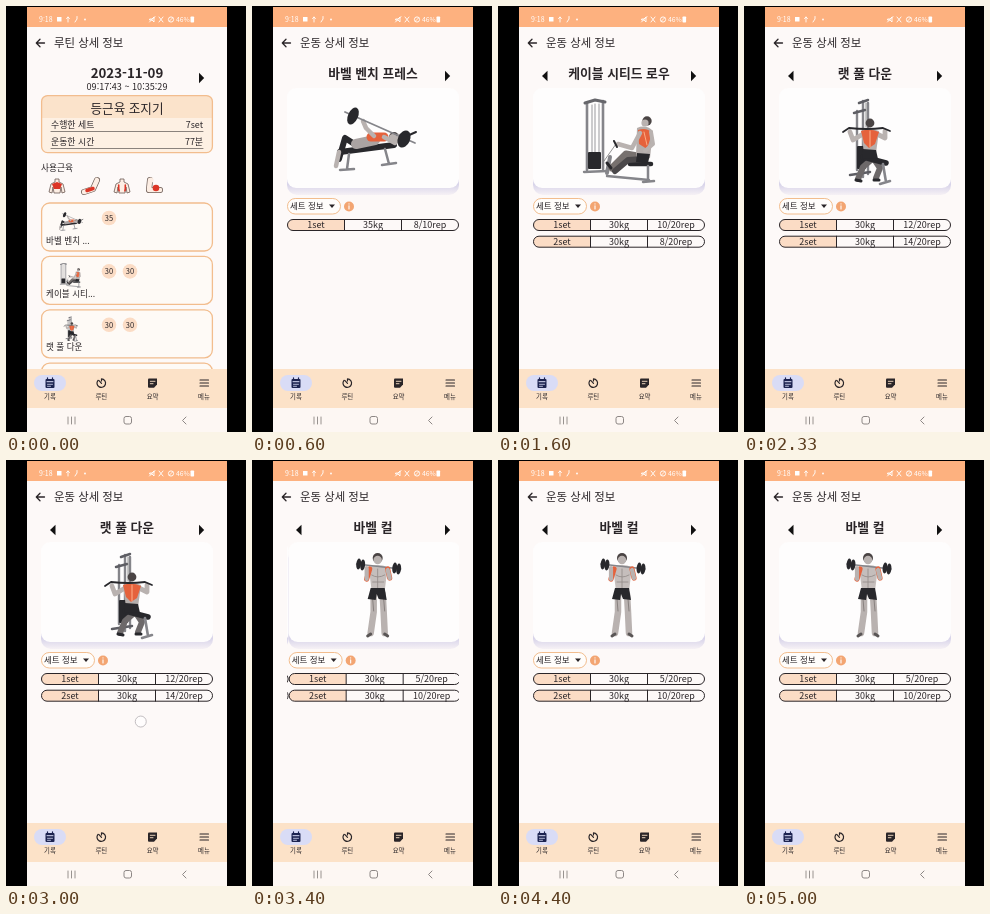
An HTML page that plays this animation: 240x426 px, repeating every 5.07 s.

```html
<!DOCTYPE html>
<html lang="ko">
<head>
<meta charset="utf-8">
<style>
html, body { margin: 0; width: 100%; height: 100%; overflow: hidden; background: #000 }
svg { display: block; width: 100%; height: 100% }
text { font-family: "Noto Sans CJK KR", "Noto Sans CJK", "Noto Sans", sans-serif; white-space: pre }
</style>
</head>
<body>
<svg id="stage" viewBox="0 0 240 426"></svg>
<script>
const LOOP = 5070, OPEN = 470, PAGE = 172;
const BG = '#fdf9f8', PEACH = '#fbdcc5', EDGE = '#f2bd8e', INK = '#2a2528';

const text = (x, y, size, s, anchor = 'start', weight = 400, fill = INK, id = '') =>
  `<text id="${id}" x="${x}" y="${y + size * .37}" font-size="${size}" text-anchor="${anchor}" font-weight="${weight}" fill="${fill}">${s}</text>`;
const mid = (x, y, size, s, weight, id) => text(x, y, size, s, 'middle', weight, INK, id);
const box = (x, y, w, h, r, fill, stroke = 'none', sw = 1) =>
  `<rect x="${x}" y="${y}" width="${w}" height="${h}" rx="${r}" fill="${fill}" stroke="${stroke}" stroke-width="${sw}"/>`;
const dot = (x, y, r, fill) => `<circle cx="${x}" cy="${y}" r="${r}" fill="${fill}"/>`;
const line = (d, color = INK, w = 1) =>
  `<path d="M${d}" fill="none" stroke="${color}" stroke-width="${w}" stroke-linecap="round" stroke-linejoin="round"/>`;
const fill = (d, color = INK) => `<path d="M${d}Z" fill="${color}"/>`;

const SKIN = '#b9b2b0', STEEL = '#85858a', DARK = '#28282c', RED = '#e5623c', HAIR = '#4a4444';

// Exercise figures, drawn where they stand in the detail card.
const figures = {
  bench:
    line('88 146L142 139', DARK, 6) + line('97 148L95 163M133 143L137 158M88 164L102 163M130 159L144 157', STEEL, 2.5) +
    line('104 139L93 132L87 153', DARK, 6) + line('87 146L84 160', SKIN, 4.5) +
    line('104 138L123 134', '#aaa3a2', 10) + line('119 131L132 131', RED, 9) + dot(142, 131, 5, HAIR) + dot(141, 132, 4, SKIN) +
    line('122 130L114 122L111 115M132 131L143 137L147 130', SKIN, 4.5) +
    line('93 106L163 137', STEEL, 1.8) +
    `<ellipse cx="101" cy="110" rx="5" ry="9" fill="${DARK}" transform="rotate(24 101 110)"/>` +
    `<ellipse cx="152" cy="133" rx="6" ry="9" fill="${DARK}" transform="rotate(24 152 133)"/>` +
    line('155 130L164 126', DARK, 2),
  cable:
    line('89 97V164M105 95V163', STEEL, 2.6) + line('87 97L97 94L107 96', '#66666b', 3) +
    line('94 99V146M97 98V146M101 98V146', '#99999d', 1) + box(90, 146, 13, 17, 1, DARK) +
    line('86 166L109 165M109 170L151 174', STEEL, 2.4) + line('112 151L109 167', STEEL, 4) +
    line('106 155L118 138', '#777', .8) + line('132 158L153 158', DARK, 4.5) + line('150 160V175M145 176L156 175', STEEL, 2.5) +
    line('145 151L128 148L114 162', '#77716f', 7) + line('145 153L130 154L117 165', '#4b484a', 6) +
    line('113 162L109 157', DARK, 3) +
    fill('139 122Q148 118 155 125L152 152Q144 156 138 150Z', '#b5aeac') + fill('140 124Q149 121 154 127L149 143L141 138Z', RED) +
    line('142 127L134 142L120 138', SKIN, 4.5) + line('153 126L155 138L147 145', SKIN, 4) +
    line('146 126L149 139', '#ffab82', 1) + fill('139 147L152 148L150 157L138 156Z', DARK) +
    dot(149, 115, 4.7, HAIR) + dot(147, 117, 3.6, SKIN) + line('116 135L119 141', DARK, 2),
  lat:
    line('119 95V171M124 97V168M113 105V164', STEEL, 2.4) + line('115 97L124 94M110 107L121 104M106 169L126 166', '#5e5e64', 2.5) +
    box(113, 140, 9, 23, 1, DARK) + line('122 97V121', '#777', .8) +
    line('127 154L119 161L114 173M130 153L136 162L132 172', '#6d696a', 6) +
    line('112 174L117 175M130 174L135 174', DARK, 3) +
    line('119 151L142 157', DARK, 5.5) + line('139 158L142 176M136 178L146 175', STEEL, 2.6) +
    line('119 128L109 134L106 126M133 128L141 132L141 125', SKIN, 4.8) +
    fill('117 125Q126 121 135 125L132 147Q125 150 120 147Z', '#b5aeac') + fill('117 125Q126 122 135 126L131 138L125 142L120 137Z', RED) +
    line('126 125V141', '#ffb08a', 1) + fill('119 143L132 144L134 153L118 152Z', DARK) + dot(126, 117, 4.4, HAIR) +
    line('99 126L105 122Q123 124 139 122L146 125', DARK, 1.8),
  curl:
    line('120 134L120 152L117 173M129 134L130 152L131 173', SKIN, 6.5) + line('119 139L120 151M130 139L131 151', '#88817f', 1) +
    line('117 174L114 176M131 174L134 176', '#5a5656', 3) +
    fill('115 107Q124 103 134 107L131 131L118 131Z', '#c5bebc') + line('124 109V129M118 115Q124 119 131 115M119 122H130', '#918987', .8) +
    fill('117 128L131 128L133 140L125 139L123 134L122 140L114 139Z', DARK) +
    line('103 104L147 109', STEEL, 1.7) +
    line('116 109L113 119', RED, 5.2) + line('134 109L136 118', RED, 5.2) + line('113 119L113 108M136 118L134 110', SKIN, 4.2) +
    dot(124, 98, 5, HAIR) + dot(124, 100, 4.2, SKIN) +
    [[105, 104], [109, 105], [141, 108], [145, 109]].map(([x, y]) =>
      `<ellipse cx="${x}" cy="${y}" rx="2.4" ry="5.6" fill="${DARK}" transform="rotate(6 ${x} ${y})"/>`).join('')
};

const exercises = [
  { fig: 'bench', title: '바벨 벤치 프레스', short: '바벨 벤치 ...', sets: [['35kg', '8/10rep']] },
  { fig: 'cable', title: '케이블 시티드 로우', short: '케이블 시티...', sets: [['30kg', '10/20rep'], ['30kg', '8/20rep']] },
  { fig: 'lat', title: '랫 풀 다운', short: '랫 풀 다운', sets: [['30kg', '12/20rep'], ['30kg', '14/20rep']] },
  { fig: 'curl', title: '바벨 컬', short: '바벨 컬', sets: [['30kg', '5/20rep'], ['30kg', '10/20rep']] }
];

const setRow = ([kg, reps], i) => {
  const y = 213.5 + i * 16.7, c = y + 5.5;
  return box(35.5, y, 171, 11, 5.5, BG) +
    fill(`92.5 ${y}H41a5.5 5.5 0 0 0 0 11H92.5`, PEACH) + box(35.5, y, 171, 11, 5.5, 'none', INK) +
    line(`92.5 ${y}v11M149.5 ${y}v11`) +
    mid(64, c, 9, i + 1 + 'set') + mid(121, c, 9, kg) + mid(178, c, 9, reps);
};

const page = (e, i) => `<g transform="translate(${i * PAGE})">` +
  box(35, 88, 172, 101, 10, 'url(#shade)') + box(35, 82, 172, 100, 9, '#fefdfd') + figures[e.fig] +
  box(35.5, 192.5, 53, 15.5, 7.7, '#fffdfb', EDGE) + text(38, 200.3, 8.5, '세트 정보') + fill('77 198.5h6l-3 3.4') +
  dot(97, 200.5, 5, '#f3a572') + line('97 199.9V203M97 197.8V197.9', '#fff', 1.1) +
  e.sets.map(setRow).join('') + '</g>';

const item = (e, i) => {
  const y = 197 + i * 53.4;
  return box(35.6, y, 170.8, 48, 8, '#fefaf6', EDGE, 1.3) +
    `<g transform="translate(${65 - 123 * .29} ${y + 19 - 135 * .29}) scale(.29)">${figures[e.fig]}</g>` +
    text(40, y + 37.5, 8.6, e.short, 'start', 500) +
    e.sets.map((s, k) => dot(103 + k * 21, y + 15, 7.3, PEACH) + mid(103 + k * 21, y + 15, 7.5, parseInt(s[0]))).join('');
};

const OUT = '#6b5a53', FLESH = '#fdeee4', MARK = '#dc3526';
const torso = (x, marks) =>
  `<g transform="translate(${x} 180)"><path d="M-2 -7H2V-4L6 -2L8 6L5 7L4 1L3 7H-3L-4 1L-5 7L-8 6L-6 -2L-2 -4Z" fill="${FLESH}" stroke="${OUT}" stroke-width=".8"/>${marks}</g>`;
const muscles =
  torso(51, fill('-5 -2L0 -4L5 -2L3 3H-3', MARK)) +
  line('78 186L87 183L91 174', OUT, 6) + line('78 186L87 183L91 174', FLESH, 4.6) + line('81 184.5L87 182.5', MARK, 3.5) +
  torso(116, fill('-4 0L-2 5L-3 6M4 0L2 5L3 6', MARK) + line('-3.3 -1V4M3.3 -1V4', MARK, 1.6)) +
  line('144 174L143 184L154 184', OUT, 6) + line('144 174L143 184L154 184', FLESH, 4.6) + dot(150, 182, 3.3, MARK) + dot(145, 174, 2.6, FLESH);

const summary = box(35, 89.5, 172, 57, 6, '#fdf0e3') + fill('35 112V95.500Q35 89.500 41 89.500H201Q207 89.500 207 95.500V112', '#fbe3cb') +
  box(35.6, 89.6, 170.8, 57, 6, 'none', EDGE, 1.3) + mid(121, 102.5, 12.6, '등근육 조지기') +
  [['수행한 세트', '7set', 119], ['운동한 시간', '77분', 136]].map(([a, b, y]) =>
    text(45, y, 8.9, a) + text(197, y, 8.9, b, 'end') + line(`45 ${y + 6.5}H197`, '#6e6662', .8)).join('');

const header = s => line('38.500 37H30.500M34 33.300L30.300 37L34 40.700', INK, 1.3) + text(48, 37, 11.4, s);
const next = y => fill(`193 ${y - 5.2}v10.400l5.200 -5.200`, '#111');

const list = `<g id="list">${header('루틴 상세 정보')}${mid(121, 67, 13.3, '2023-11-09', 700)}
  ${mid(121, 81, 9.1, '09:17:43 ~ 10:35:29', 500)}${next(72)}${summary}
  ${text(35, 162, 8.7, '사용근육', 'start', 500)}${muscles}${exercises.map(item).join('')}</g>`;

const detail = `<g id="detail">${header('운동 상세 정보')}${mid(121, 67, 12.8, '', 700, 'title')}
  <g id="prev">${fill('49.500 64.800v10.400l-5.500 -5.200', '#111')}</g>${next(70)}
  <g clip-path="url(#view)"><g id="pager">${exercises.map(page).join('')}</g></g></g>`;

const statusBar = box(21, 1, 200, 20, 0, '#fdb17f') + text(33, 13.3, 7, '9:18', 'start', 400, '#fff') +
  box(51, 11, 4.5, 4.5, 0, '#fff') + line('62 16V11M60.500 12.500L62 11L63.500 12.500M69 16L71 13V10.500', '#fff', .9) + dot(79, 13.5, .9, '#fff') +
  line('144 13H146L148 11V16L146 14H144ZM143.500 16L149 10.500', '#fff', .9) +
  line('153 11L157 16M157 11L153 16', '#fff', .9) +
  `<circle cx="165" cy="13.500" r="2.600" fill="none" stroke="#fff" stroke-width=".9"/>` + line('163.300 15.200L166.700 11.800', '#fff', .8) +
  text(170, 13.3, 6.8, '46%', 'start', 400, '#fff') + box(184.5, 10.5, 3.6, 6, .8, '#fff');

const navBar = box(21, 363, 200, 39, 0, '#fce2c8') + box(28, 369, 32, 16, 8, '#d9dcf6') +
  box(39.5, 373, 9, 9, 1, '#1c2350') + line('41.500 371.800V373M46.500 371.800V373', '#1c2350', 1.2) +
  line('41 375.700H47', '#d9dcf6', 1) + line('41.500 378.300H46.500M41.500 380.300H44.500', '#d9dcf6', .8) +
  line('92 374.300A4.300 4.300 0 1 0 95.500 372.800V375M95.500 377.300L93 374.700', INK, 1.2) +
  fill('143 372.500H151V378.500L148 381.700H143Q142 381.700 142 380.700V373.500Q142 372.500 143 372.500') +
  line('144.300 375.300H149M144.300 377.700H147', '#fce2c8', .9) +
  line('194 374H202.500M194 377H202.500M194 380H202.500', INK, 1.1) +
  ['기록', '루틴', '요약', '메뉴'].map((s, i) => mid(44 + i * 51.3, 391, 6.4, s, 500)).join('') +
  box(21, 402, 200, 24, 0, '#fdf7f3') + line('62 411V418M65.500 411V418M69 411V418', '#8d8785', .9) +
  box(118, 410.5, 7.5, 7.5, 2, 'none', '#8d8785', 1) + line('180 411L176.500 414.500L180 418', '#8d8785', 1);

const $ = id => document.getElementById(id);
$('stage').innerHTML = `<defs>
  <clipPath id="screen"><rect x="21" y="1" width="200" height="425"/></clipPath>
  <clipPath id="view"><rect x="35" y="80" width="172" height="283"/></clipPath>
  <linearGradient id="shade" x2="0" y2="1"><stop offset=".9" stop-color="#d9d5ea"/><stop offset="1" stop-color="#f6f1f5"/></linearGradient>
  </defs><rect width="240" height="426" fill="#000"/>
  <g clip-path="url(#screen)">${box(21, 1, 200, 425, 0, BG)}${list}${detail}${statusBar}${navBar}
  <circle id="touch" r="5.500" fill="#fff" fill-opacity=".7" stroke="#bcb7ba" stroke-width=".9"/></g>`;

// Start times of the finger swipes; the last one meets the end of the pager.
const swipes = [983, 1750, 2996, 3796], DRAG = 170, SETTLE = 330, SLOP = 8, REACH = 110;

function draw(t) {
  let shift = 0, finger = null;
  swipes.forEach((start, i) => {
    const u = (t - start) / DRAG;
    if (u < 0) return;
    if (u <= 1) finger = [138 - REACH * u, 262 - 15 * u];
    if (i >= exercises.length - 1) return;
    const dragged = Math.max(0, REACH * Math.min(u, 1) - SLOP);
    const s = Math.min(1, Math.max(0, (t - start - DRAG) / SETTLE));
    shift += dragged + (PAGE - dragged) * (1 - (1 - s) ** 3);
  });
  const index = Math.floor(shift / PAGE + .45), opened = t >= OPEN;
  $('list').setAttribute('display', opened ? 'none' : 'inline');
  $('detail').setAttribute('display', opened ? 'inline' : 'none');
  $('prev').setAttribute('display', index ? 'inline' : 'none');
  $('title').textContent = exercises[index].title;
  $('pager').setAttribute('transform', `translate(${-shift})`);
  $('touch').setAttribute('display', finger ? 'inline' : 'none');
  if (finger) $('touch').setAttribute('transform', `translate(${finger})`);
}

const began = performance.now();
function tick() {
  draw((performance.now() - began) % LOOP);
  requestAnimationFrame(tick);
}
tick();
</script>
</body>
</html>
```
